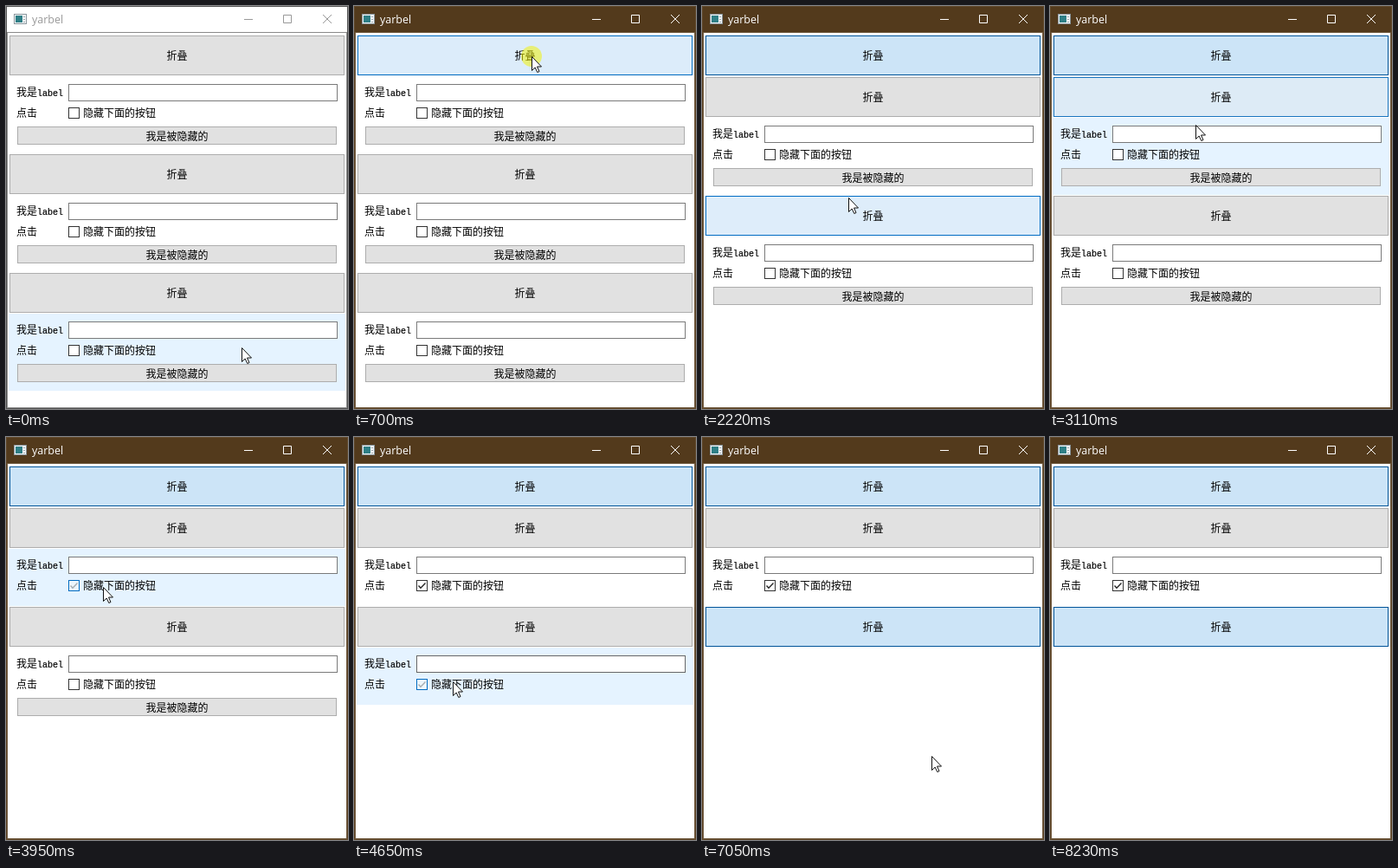
Write an HTML page that moves like this. It is 395 by 465 pixels and loops after 8440 ms.

```html
<!DOCTYPE html>
<html lang="zh-CN">
<head>
<meta charset="utf-8">
<title>Folding panels</title>
<style>
html, body { margin: 0; width: 100%; height: 100%; overflow: hidden; background: #fff; }
#app { position: absolute; left: 0; top: 0; width: 395px; height: 465px; overflow: hidden;
  font: 12px/20px "Noto Sans CJK SC", "Noto Sans CJK", sans-serif; color: #000; white-space: nowrap; }
#app * { position: absolute; box-sizing: border-box; }
#frame { inset: 0; background: #fff; border: 1px solid #555; color: #999; }
#client { left: 1px; top: 30px; width: 393px; height: 434px; background: #fff; border: 1px solid #8a8a8a; }
.active #frame { background: #533a1c; border-color: #624a2d; color: #fff; }
.active #client { border-color: #6b5438; }
#name { left: 29px; top: 5px; font: 12.5px/20px "Open Sans", sans-serif; }
#bar { left: -1px; top: -1px; }
.section { left: 0; width: 395px; height: 137px; }
.panel { left: 3px; top: 47px; width: 389px; }
.button { border: 1px solid #adadad; text-align: center; }
.fold { left: 4px; top: 0; width: 387px; height: 46px; line-height: 43px; }
.hide { left: 13px; top: 105px; width: 369px; height: 21px; line-height: 19px; }
.edit { left: 72px; top: 56px; width: 311px; height: 20px; border: 1px solid; background: #fff; }
.tick { left: 72px; top: 83px; width: 13px; height: 13px; border: 1px solid; }
.tick svg { left: -1px; top: -1px; }
.label { left: 12px; top: 55px; }
#app .label span { position: static; font: 10px "Liberation Mono", monospace; -webkit-text-stroke: .2px; }
.click { left: 12px; top: 79px; }
.caption { left: 89px; top: 79px; }
#halo { width: 24px; height: 24px; margin: -12px; border-radius: 50%; background: rgba(242, 242, 0, .52); }
#cursor { overflow: visible; }
</style>
</head>
<body>
<div id="app">
  <div id="frame">
    <svg id="bar" width="395" height="30" fill="none" stroke="currentColor">
      <rect x="9.5" y="9.5" width="14" height="11" fill="#f4f6f7" stroke="#8b979e"/>
      <rect x="11" y="11" width="8" height="8" fill="#2f7f86" stroke="none"/>
      <path d="M20 12.5h2M20 15.5h2M20 18.5h2" stroke="#9aa5ab"/>
      <path d="M275 15.5h10M320.5 10.5h9v9h-9zM366 10l10 10M376 10l-10 10"/>
    </svg>
    <div id="name">yarbel</div>
  </div>
  <div id="client"></div>
  <div id="sections"></div>
  <div id="halo"></div>
  <svg id="cursor" width="13" height="20">
    <path d="M.5 .5V16.5L4.2 13 6.8 18.5 9 17.5 6.5 12H11.5Z" fill="#fff" stroke="#111"/>
  </svg>
</div>
<script>
const LOOP = 8440, STEP = 70;

// Stretches in which the picture updates every STEP ms; it holds in between.
const runs = [[0, 1680], [2010, 2710], [2970, 4720], [4860, 4860], [5060, 5200],
  [5460, 5600], [5790, 6280], [6420, 7610], [7740, 8230]];

// time, x, y
const path = [
  [0, 272, 394], [210, 250, 290], [350, 222, 150], [560, 205, 58], [770, 205, 58],
  [840, 204, 80], [910, 200, 150], [1120, 186, 238], [1680, 172, 238], [2150, 172, 238],
  [2220, 169, 221], [2430, 168, 116], [3040, 168, 116], [3110, 168, 137], [3670, 112, 173],
  [3950, 112, 173], [4230, 113, 225], [4510, 114, 282], [5390, 114, 282], [5600, 225, 328],
  [5930, 276, 336], [6000, 281, 297], [6070, 281, 277], [6280, 266, 220], [6420, 266, 220],
  [6630, 240, 95], [6700, 238, 77], [6910, 255, 250], [7120, 270, 427], [7400, 250, 112],
  [7610, 248, 105], [7880, 256, 260], [8160, 266, 463], [8230, 268, 500]];

// press, release, section, control
const clicks = [
  [700, 770, 0, 'fold'], [1190, 1330, 2, 'fold'], [2010, 2150, 2, 'fold'],
  [2500, 2640, 1, 'fold'], [2970, 3040, 1, 'fold'], [3810, 3950, 1, 'tick'],
  [4510, 4650, 2, 'tick'], [5060, 5130, 2, 'tick'], [6280, 6420, 2, 'fold']];

// Hit areas inside a section: left, top, right, bottom
const areas = { fold: [4, 0, 391, 46], edit: [72, 56, 383, 76],
  tick: [72, 80, 383, 98], hide: [13, 105, 382, 126] };

const mix = (a, b, k) => a.map((v, i) => v + (b[i] - v) * k);
const rgb = c => `rgb(${c.map(Math.round)})`;
const shade = (normal, hover, pressed, { h, p }) => rgb(mix(mix(normal, hover, h), pressed, p));
const toward = (v, on, up, down) => on ? Math.min(1, v + up) : Math.max(0, v - down);
const inside = (x, y, [l, t, r, b]) => x >= l && x < r && y >= t && y < b;

function cursorAt(t) {
  const i = path.findIndex(k => k[0] > t);
  if (i < 0) return path[path.length - 1].slice(1);
  const a = path[i - 1], b = path[i];
  return mix(a.slice(1), b.slice(1), (t - a[0]) / (b[0] - a[0])).map(Math.round);
}

function simulate() {
  const levels = [0, 1, 2].map(() =>
    Object.fromEntries(Object.keys(areas).map(n => [n, { h: 0, p: 0, mark: 0 }])));
  const frames = [];
  let last = 0;
  for (const [start, end] of runs) for (let t = start; t <= end; t += STEP) {
    const n = (t - last) / STEP;
    const [x, y] = cursorAt(t);
    const held = clicks.find(c => t >= c[0] && t < c[1]);
    const isOn = (i, name) =>
      clicks.filter(c => c[1] <= t && c[2] === i && c[3] === name).length % 2 === 1;
    let top = 34;
    const sections = levels.map((set, i) => {
      const folded = isOn(i, 'fold'), checked = isOn(i, 'tick');
      const size = folded ? 48 : checked ? 114 : 137;
      const state = { top, folded, checked, size,
        lit: !folded && inside(x, y - top, [3, 47, 392, size - 1]) };
      for (const name in areas) {
        const lv = set[name];
        const shown = name === 'fold' || !folded && !(name === 'hide' && checked);
        const over = shown && inside(x, y - top, areas[name]);
        const down = held && held[2] === i && held[3] === name || name === 'fold' && folded;
        lv.h = toward(lv.h, over, .35 * n, (name === 'edit' ? .17 : .2) * n);
        lv.p = toward(lv.p, down, .35 * n, .35 * n);
        lv.mark = toward(lv.mark, name === 'tick' && checked, .35 * n, .5 * n);
        state[name] = { ...lv };
      }
      top += size;
      return state;
    });
    frames.push({ t, x, y, held: !!held, sections });
    last = t;
  }
  return frames;
}

const $ = id => document.getElementById(id);
$('sections').innerHTML = `
  <div class="section">
    <div class="panel"></div>
    <div class="button fold">折叠</div>
    <div class="body">
      <div class="label">我是<span>label</span></div><div class="edit"></div>
      <div class="click">点击</div>
      <div class="tick"><svg width="13" height="13"><path d="M2.5 6.5L5 9.2L10.5 3.6" fill="none" stroke="#222" stroke-width="1.4"/></svg></div>
      <div class="caption">隐藏下面的按钮</div>
      <div class="button hide">我是被隐藏的</div>
    </div>
  </div>`.repeat(3);
const views = [...document.querySelectorAll('.section')].map(root => ({
  root, part: Object.fromEntries(['panel', 'fold', 'body', 'edit', 'tick', 'hide']
    .map(n => [n, root.querySelector('.' + n)])), mark: root.querySelector('.tick path') }));

const GREY = [225, 225, 225], EDGE = [173, 173, 173], WHITE = [255, 255, 255];
const HOVER = [229, 241, 251], BLUE = [0, 120, 215], DOWN = [204, 228, 247], NAVY = [0, 84, 153];

function paint(el, bg, edge) {
  el.style.backgroundColor = bg;
  el.style.borderColor = edge;
}

function draw(f) {
  $('app').className = f.t >= 700 ? 'active' : '';
  f.sections.forEach((s, i) => {
    const { root, part, mark } = views[i];
    root.style.top = s.top + 'px';
    part.panel.style.height = s.size - 48 + 'px';
    part.panel.style.background = s.lit ? '#e5f3ff' : 'none';
    part.body.style.display = s.folded ? 'none' : 'block';
    part.hide.style.display = s.checked ? 'none' : 'block';
    for (const n of ['fold', 'hide'])
      paint(part[n], shade(GREY, HOVER, DOWN, s[n]), shade(EDGE, BLUE, NAVY, s[n]));
    paint(part.tick, shade(WHITE, WHITE, DOWN, s.tick), shade([51, 51, 51], BLUE, NAVY, s.tick));
    paint(part.edit, '#fff', rgb(mix([122, 122, 122], [23, 23, 23], s.edit.h)));
    mark.style.opacity = s.tick.mark;
  });
  for (const id of ['halo', 'cursor']) {
    $(id).style.left = f.x + 'px';
    $(id).style.top = f.y + 'px';
  }
  $('halo').style.display = f.held ? 'block' : 'none';
}

const frames = simulate();
const origin = performance.now();
let shown;
function tick() {
  const t = (performance.now() - origin) % LOOP;
  let i = frames.length - 1;
  while (i > 0 && frames[i].t > t) i--;
  if (i !== shown) draw(frames[shown = i]);
  requestAnimationFrame(tick);
}
tick();
</script>
</body>
</html>
```
